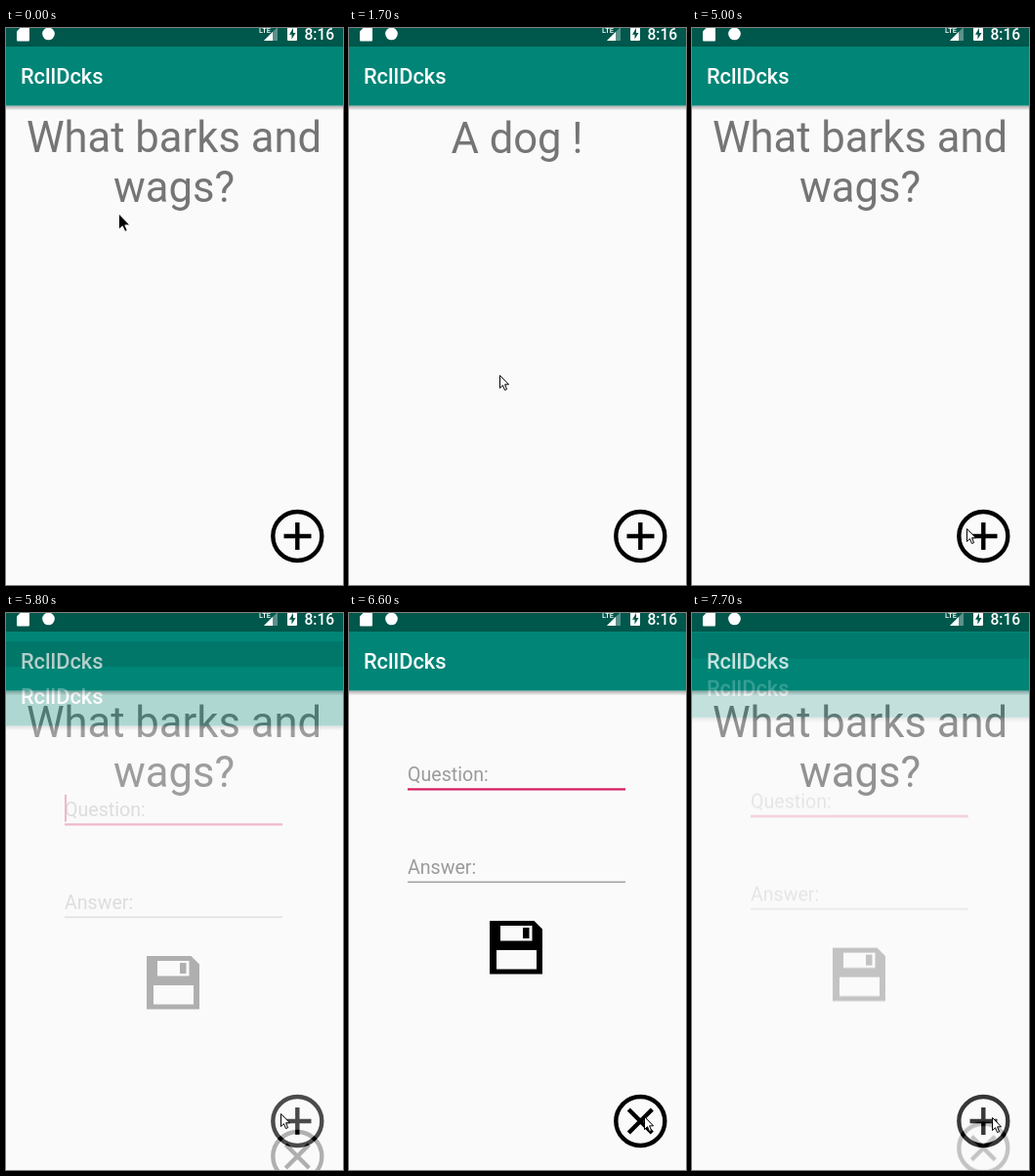
Animation, 345 px wide and 570 px high, one loop 8000 ms. Source, as an HTML page:

```html
<!DOCTYPE html>
<html lang="en">
<head>
<meta charset="utf-8">
<title>Flash cards</title>
<style>
html, body { margin: 0; width: 100%; height: 100%; overflow: hidden; background: #fafafa; }
svg { display: block; width: 345px; height: 570px; font-family: Roboto, sans-serif; }
.title { font-size: 21.8px; font-weight: 500; fill: #fff; }
.card { font-size: 43.6px; fill: #757575; text-anchor: middle; }
.hint { font-size: 19.6px; fill: #9b9b9b; }
.clock { font-size: 15.6px; font-weight: 500; }
.stroke { fill: none; stroke: #000; stroke-width: 4.4; }

/* 1.25% of the loop is one 100 ms step */
.question, .answer, .form, .caret, .pointer, .black, .white {
  animation: 8s step-end infinite;
}
.question { animation-name: question; }
.answer { animation-name: answer; }
.form { animation-name: form; }
.caret { animation-name: caret; }
.pointer { animation-name: pointer; }
.black { animation-name: black; }
.white { animation-name: white; }

@keyframes question { 0%, 50% { opacity: 1; } 17.5% { opacity: 0; } }
@keyframes answer { 0%, 50% { opacity: 0; } 17.5% { opacity: 1; } 100% { opacity: 0; } }
@keyframes black { 0% { opacity: 1; } 1.25%, 100% { opacity: 0; } }
@keyframes white { 0% { opacity: 0; } 1.25%, 100% { opacity: 1; } }
@keyframes caret {
  0%, 80%, 91.25%, 100% { opacity: 0; }
  72.5%, 85% { opacity: 1; }
}
@keyframes form {
  0% { opacity: 0; transform: translateY(45.6px); }
  72.5% { opacity: .3; transform: translateY(36px); }
  73.75% { opacity: .97; transform: translateY(6px); }
  75% { opacity: 1; transform: translateY(.4px); }
  76.25% { opacity: 1; transform: translateY(0); }
  95% { opacity: .87; transform: translateY(2.4px); }
  96.25%, 100% { opacity: .22; transform: translateY(27.6px); }
}
@keyframes pointer {
  0% { transform: translate(115px, 190px); }
  6.25% { transform: translate(133px, 254px); }
  11.25% { transform: translate(134px, 264px); }
  18.75% { transform: translate(140px, 302px); }
  20% { transform: translate(150px, 340px); }
  21.25% { transform: translate(154px, 355px); }
  43.75% { transform: translate(174px, 229px); }
  45% { transform: translate(184px, 188px); }
  46.25% { transform: translate(188px, 173px); }
  47.5% { transform: translate(188px, 170px); }
  52.5% { transform: translate(228px, 330px); }
  53.75% { transform: translate(261px, 445px); }
  56.25% { transform: translate(271px, 478px); }
  57.5% { transform: translate(278px, 502px); }
  58.75% { transform: translate(281px, 511px); }
  62.5% { transform: translate(281px, 512px); }
  80% { transform: translate(286px, 513px); }
  81.25% { transform: translate(295px, 514px); }
  82.5% { transform: translate(302px, 515px); }
  83.75% { transform: translate(305px, 516px); }
  85% { transform: translate(306px, 516px); }
  87.5%, 100% { transform: translate(307px, 516px); }
}
</style>
</head>
<body>
<svg viewBox="0 0 345 570">
  <defs>
    <linearGradient id="shade" x2="0" y2="1">
      <stop offset="0" stop-opacity=".32"/>
      <stop offset="1" stop-opacity="0"/>
    </linearGradient>
    <g id="bar">
      <rect y="79.5" width="345" height="5" fill="url(#shade)"/>
      <rect y="-7" width="345" height="26" fill="#00574b"/>
      <rect y="19" width="345" height="60.5" fill="#008577"/>
      <text class="title" x="15" y="57">RcllDcks</text>
    </g>
    <circle id="ring" class="stroke" cx="298.3" cy="520" r="25"/>
  </defs>

  <rect width="345" height="570" fill="#fafafa"/>
  <use href="#bar"/>
  <g class="card">
    <g class="question">
      <text x="172" y="126.5">What barks and</text>
      <text x="172" y="177.5">wags?</text>
    </g>
    <text class="answer" x="172" y="128">A dog !</text>
  </g>
  <use href="#ring"/>
  <path class="stroke" d="M284.5 520h28M298.3 506v28"/>

  <g class="form">
    <rect y="-7" width="345" height="577" fill="#fafafa"/>
    <use href="#bar"/>
    <text class="hint" x="60" y="171.5">Question:</text>
    <rect x="60" y="179.3" width="223" height="2.2" fill="#d81b60"/>
    <rect class="caret" x="60" y="150" width="2" height="27.5" fill="#d81b60"/>
    <text class="hint" x="60" y="267">Answer:</text>
    <rect x="60" y="274.7" width="223" height="1.1" fill="#858585"/>
    <path fill-rule="evenodd" d="M144 315h45.5l8.5 8.5V369.500h-54z
      M155 320v15.500h32.500V320z M151 345v19.500h41V345z"/>
    <rect x="178" y="322" width="6.500" height="11"/>
    <use href="#ring"/>
    <path class="stroke" d="M286.300 508l24 24m0-24l-24 24"/>
  </g>

  <g fill="#fff">
    <path d="M11 3.500L14.500 0H24v12.500q0 1-1 1H12q-1 0-1-1z"/>
    <circle cx="43.500" cy="6" r="6.300"/>
    <text x="259" y="5" font-size="7.500" font-weight="500">LTE</text>
    <path d="M264 13L278 -1V13z" opacity=".35"/>
    <path d="M264 13L273 4V13z"/>
    <rect x="288" y="-2" width="10" height="15" rx="1"/>
    <path d="M294 0L290 6.700h2.500V11.500l4-6.500h-2.500z" fill="#00574b"/>
    <text class="clock" x="305.500" y="12">8:16</text>
  </g>

  <g class="pointer">
    <path class="black" d="M.5 0V16L4.300 12.800L6.800 18.300L9.200 17.300L6.800 11.800H11.800z"
      stroke="#fff" stroke-width=".8"/>
    <path class="white" d="M.5 .5V13.500L3.500 10.700L5.500 15.500L7.600 14.700L5.600 9.800H9.500z"
      fill="#fff" stroke="#000"/>
  </g>
</svg>
</body>
</html>
```
